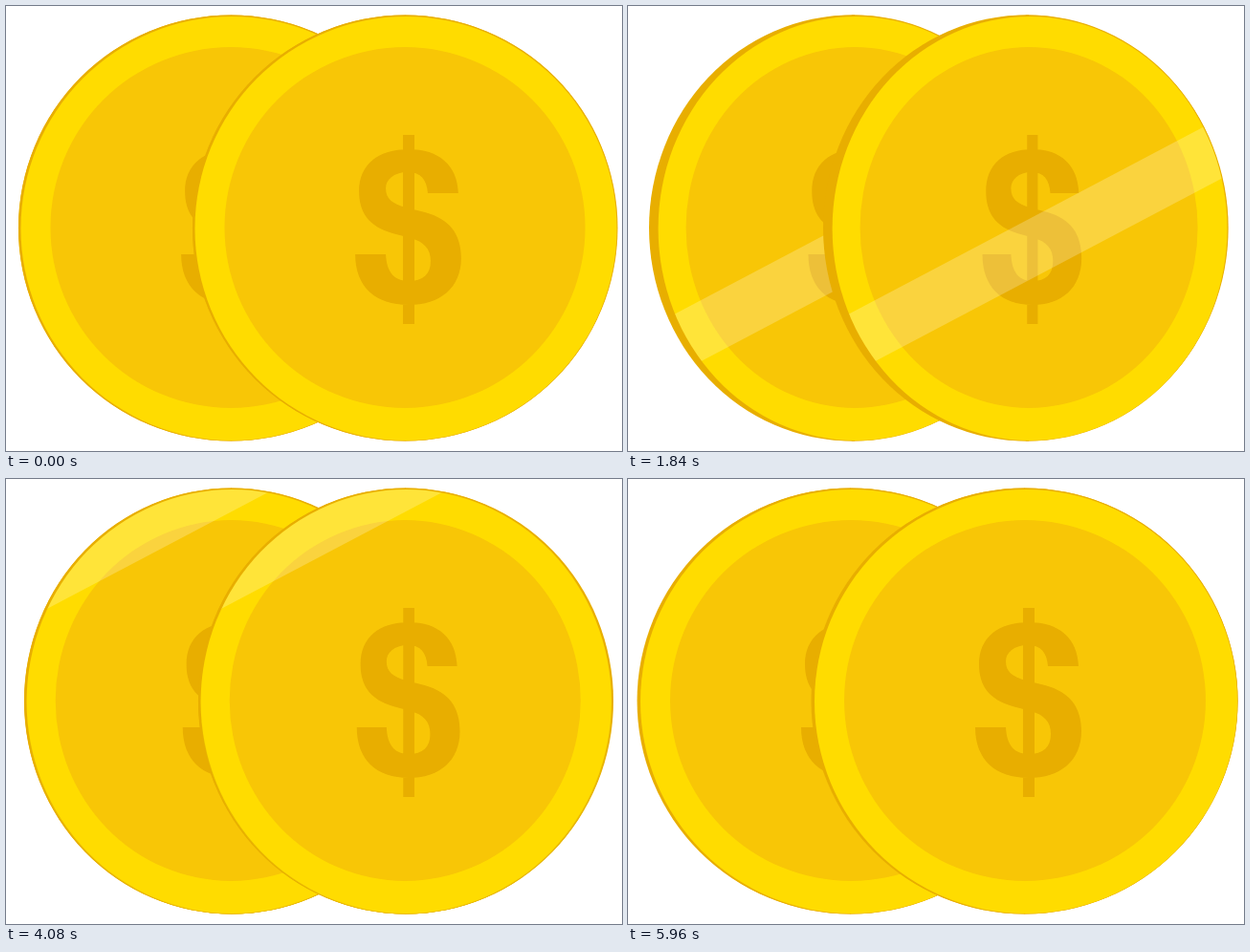
An HTML page with a canvas for the animation above (6.76 s loop, 644 by 466 pixels).

```html
<!DOCTYPE html>
<html lang="en">
<head>
<meta charset="utf-8">
<title>Spinning coins</title>
<style>
  html, body { margin: 0; width: 100%; height: 100%; overflow: hidden; background: #fff; }
  canvas { display: block; }
</style>
</head>
<body>
<canvas id="stage" width="644" height="466"></canvas>
<script>
const ctx = document.getElementById('stage').getContext('2d');
const LOOP = 6760, MOVE = 5960, STEP = 40, TURN = 1987, GAP = 182;
const RIM = '#ffdc00', FACE = '#f8c606', MARK = '#e8ae00', SIDE = '#e8b800';
const CY = 233, SLOPE = 0.528, BAND = 64;

// Dollar sign around x = 0: the S with flat terminals, then the bar.
const sign = new Path2D(`
  M53 196 H21 C20 182 14 174 0 174 C-15 174 -23 182 -23 191
  C-23 202 -16 207 -2 211 L18 216 C44 223 56 239 56 264
  C56 295 34 313 1 313 C-34 313 -55 294 -55 260 H-23
  C-22 279 -14 288 1 288 C16 288 24 281 24 267
  C24 254 17 247 3 243 L-16 238 C-40 231 -51 217 -51 194
  C-51 166 -31 150 1 150 C33 150 52 167 53 196 Z
  M-5 135 H7 V333 H-5 Z`);

const smooth = s => s * s * (3 - 2 * s);
const sine = s => (1 - Math.cos(Math.PI * s)) / 2;

// Face centre, half width, side depth and direction of the side.
function poseAt(t) {
  const phase = t % TURN, half = TURN / 2;
  if (phase < half) {
    const s = phase / half, g = smooth(s), turn = sine(s);
    const x = 418 + 17 * turn ** 1.2, rx = 220.5 - 211 * turn;
    const right = 639 - 141 * (g - g ** 4 * (1 - g));
    return { x, rx, depth: Math.max(0, right - x - rx), dir: 1, lip: 1, inner: x - 1 };
  }
  const g = smooth((TURN - phase) / half), h = 1 - g;
  const x = 416 + 68 * g, rx = Math.max(4, 221 * h - 27 * g * h);
  const left = 194 + 239 * (g - 2.35 * g * g * h ** 3);
  return { x, rx, depth: Math.max(0, x - rx - left), dir: -1, lip: 8, inner: x - h };
}

// Top of the light band, measured at x = 420.
const bandAt = t => t < 3480 ? 32 + 0.1765 * (t - 760) : 123 + 0.275 * (t - 4640);

function oval(x, y, rx, ry, color) {
  ctx.fillStyle = color;
  ctx.beginPath();
  ctx.ellipse(x, y, rx, ry, 0, 0, 2 * Math.PI);
  ctx.fill();
}

function slab(x, rx, depth, dir, y, ry, color) {
  const back = x + dir * depth * 0.45;
  oval(x, y, rx, ry, color);
  oval(back, y, rx + depth * 0.55, ry, color);
  ctx.fillRect(Math.min(x, back), y - ry, Math.abs(back - x), 2 * ry);
}

function drawCoin(p, band) {
  slab(p.x - 1, p.rx + 1.5, p.depth, p.dir, 232.5, 223, MARK);
  if (p.depth > p.lip) slab(p.x, p.rx, p.depth - p.lip, p.dir, 235.5, 220, SIDE);
  oval(p.x, CY, p.rx, 222, RIM);
  oval(p.inner, 232, p.rx * 0.855, 189, FACE);

  const k = p.rx / 221;
  ctx.save();
  ctx.translate(p.inner + 3 * k, 0);
  ctx.scale(k, 1);
  ctx.fillStyle = MARK;
  ctx.fill(sign);
  ctx.restore();

  ctx.save();
  ctx.beginPath();
  ctx.ellipse(p.x, CY, p.rx, 222, 0, 0, 2 * Math.PI);
  ctx.clip();
  const edge = x => band - SLOPE * (x - 420);
  ctx.fillStyle = 'rgba(255,255,255,.225)';
  ctx.beginPath();
  ctx.moveTo(150, edge(150));
  ctx.lineTo(700, edge(700));
  ctx.lineTo(700, edge(700) + BAND);
  ctx.lineTo(150, edge(150) + BAND);
  ctx.fill();
  ctx.restore();
}

const start = performance.now();
function draw() {
  const now = Math.max(0, performance.now() - start) % LOOP;
  const t = Math.min(MOVE, Math.floor(now / STEP) * STEP);
  const pose = poseAt(t), band = bandAt(t);
  ctx.fillStyle = '#fff';
  ctx.fillRect(0, 0, 644, 466);
  ctx.save();
  ctx.translate(-GAP, 0);
  drawCoin(pose, band);
  ctx.restore();
  drawCoin(pose, band);
  requestAnimationFrame(draw);
}
draw();
</script>
</body>
</html>
```
